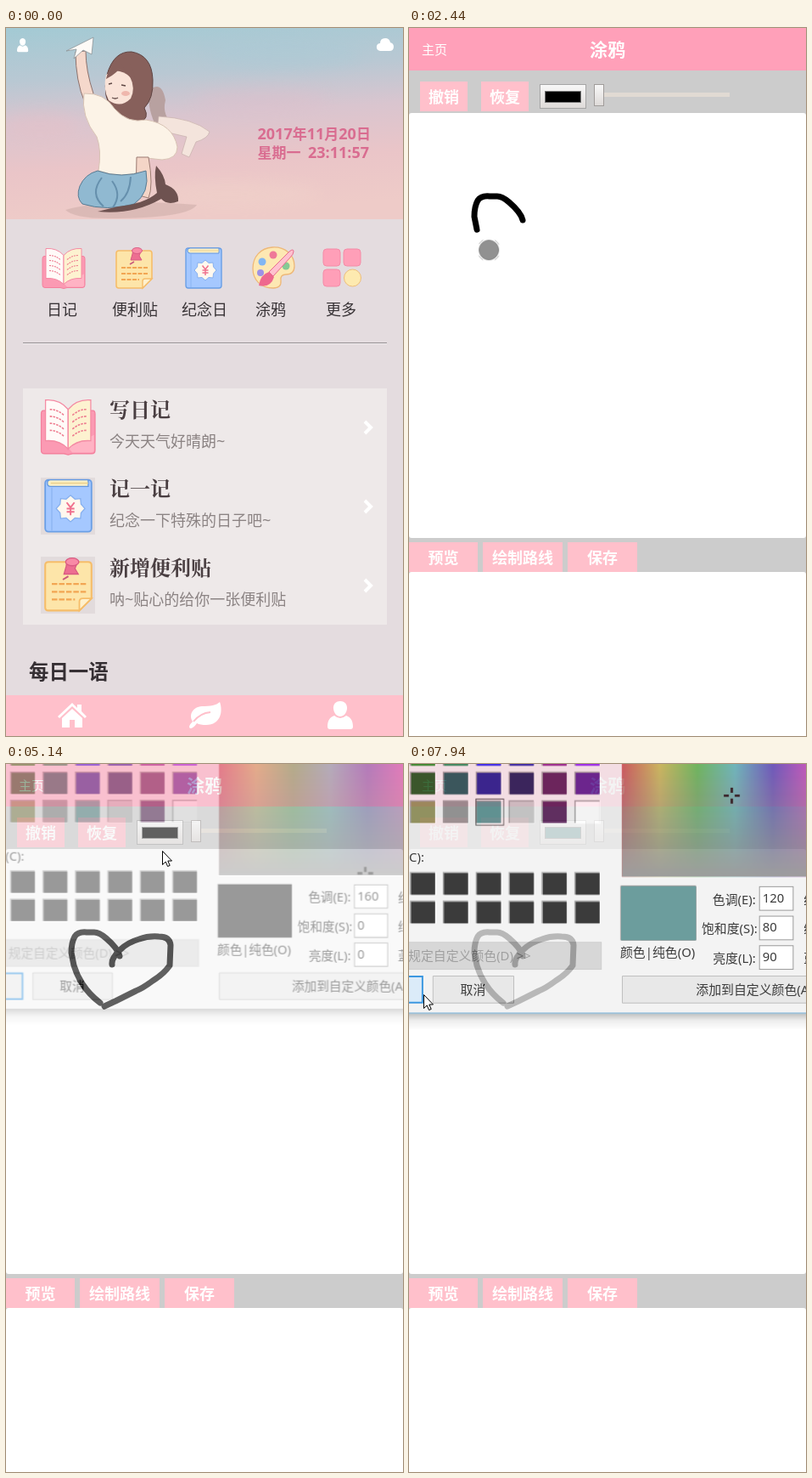
An HTML page that plays this animation: 468 by 833 pixels, repeating every 8000 ms.

```html
<!DOCTYPE html>
<html lang="zh-CN">
<head>
<meta charset="utf-8">
<title>涂鸦</title>
<style>
html, body { margin: 0; width: 100%; height: 100%; overflow: hidden; background: #fff; }
svg { display: block; width: 468px; height: 833px; }
text { font-family: "Noto Sans", "Noto Sans CJK SC", sans-serif; white-space: pre; }
.b { font-weight: 700; }
.w { fill: #fff; }
.serif { font-family: "Noto Serif CJK SC", "Noto Serif", serif; font-weight: 600; }
.anim, .anim * { animation: 8s linear infinite; }

#home { animation-name: home; }
#sec57 { animation-name: sec57; }
#sec58 { animation-name: sec58; }
#bar { animation-name: bar; }
#line1 { animation-name: line1; }
#line2 { animation-name: line2; }
.line { fill: none; stroke: #000; stroke-width: 7; stroke-linecap: round; stroke-linejoin: round; stroke-dasharray: 1 2; }
#touch { animation-name: touch, touchShow; }
#arrow { animation-name: arrow, arrowShow; }
#dialog { animation-name: dialog; transform-origin: 250px 0; }
#well { animation-name: well; }
.before { animation-name: before; }
.after { animation-name: after; }
#ok { animation-name: ok; }
#edge { animation-name: edge; }

@keyframes home { 0%, 14.12% { opacity: 1 } 14.125%, 100% { opacity: 0 } }
@keyframes sec57 { 0%, 3.74% { opacity: 1 } 3.75%, 100% { opacity: 0 } }
@keyframes sec58 { 0%, 3.74% { opacity: 0 } 3.75%, 100% { opacity: 1 } }
@keyframes bar { 0%, 18.8% { opacity: 1 } 22%, 100% { opacity: 0 } }
@keyframes line1 {
  0%, 25.6% { stroke-dashoffset: 1.1 } 25.625% { stroke-dashoffset: .99 }
  30.5% { stroke-dashoffset: .35 } 32.6%, 100% { stroke-dashoffset: 0 }
}
@keyframes line2 {
  0%, 36.24% { stroke-dashoffset: 1.1 } 36.25%, 38% { stroke-dashoffset: .99 }
  48.75% { stroke-dashoffset: .07 } 50.6%, 100% { stroke-dashoffset: 0 }
}
@keyframes touchShow {
  0%, 1.6% { opacity: 0 } 1.62%, 62.9% { opacity: 1 } 62.92%, 100% { opacity: 0 }
}
@keyframes touch {
  0%, 1.62% { transform: translate(320px, 627px) }
  7.12%, 10.5% { transform: translate(383px, 203px) }
  11.12%, 16.9% { transform: translate(304px, 293px) }
  18.87% { transform: translate(258px, 288px) }
  21.2% { transform: translate(185px, 248px) }
  22.5% { transform: translate(150px, 235px) }
  23.7%, 25.6% { transform: translate(137px, 228px) }
  26.6% { transform: translate(124px, 210px) }
  27.5% { transform: translate(106px, 199px) }
  28.5% { transform: translate(87px, 199px) }
  29.3% { transform: translate(78px, 213px) }
  30% { transform: translate(82px, 241px) }
  30.5% { transform: translate(94px, 261px) }
  32%, 33.5% { transform: translate(112px, 284px) }
  35.25%, 38% { transform: translate(128px, 241px) }
  39.3% { transform: translate(137px, 217px) }
  41% { transform: translate(161px, 204px) }
  42.5% { transform: translate(186px, 204px) }
  43.7% { transform: translate(196px, 217px) }
  44.8% { transform: translate(193px, 238px) }
  46% { transform: translate(178px, 253px) }
  47.4% { transform: translate(150px, 270px) }
  48.75% { transform: translate(128px, 284px) }
  50.6%, 52% { transform: translate(119px, 287px) }
  60.25%, 100% { transform: translate(183px, 90px) }
}
@keyframes arrowShow { 0%, 62.9% { opacity: 0 } 62.92%, 100% { opacity: 1 } }
@keyframes arrow {
  0%, 64.8% { transform: translate(184px, 102px) }
  71% { transform: translate(145px, 43px) }
  72.9% { transform: translate(151px, 27px) }
  79.6%, 84.6% { transform: translate(98px, 61px) }
  84.62%, 89% { transform: translate(98px, 53px) }
  97.5%, 100% { transform: translate(17px, 271px) }
}
@keyframes dialog {
  0%, 62.9% { opacity: 0; transform: scale(.962) }
  64.25% { opacity: .4; transform: scale(.977) }
  66.2%, 98.3% { opacity: 1; transform: none }
  99.25%, 100% { opacity: .77; transform: scale(.992) }
}
@keyframes well { 0%, 98.24% { fill: #000 } 98.25%, 100% { fill: #408080 } }
@keyframes before { 0%, 86.49% { opacity: 1 } 86.5%, 100% { opacity: 0 } }
@keyframes after { 0%, 86.49% { opacity: 0 } 86.5%, 100% { opacity: 1 } }
@keyframes ok { 0%, 96.9% { fill: #e1e1e1 } 97%, 100% { fill: #d0e6f8 } }
@keyframes edge { 0%, 98.2% { fill: #777 } 98.25%, 100% { fill: #2b86c5 } }
</style>
</head>
<body>
<svg class="anim" viewBox="0 0 468 833">
<defs>
  <linearGradient id="sky" x2=".12" y2="1">
    <stop stop-color="#a3cad4"/><stop offset=".28" stop-color="#b9c8d3"/><stop offset=".5" stop-color="#d9c5cf"/>
    <stop offset=".75" stop-color="#eac5c8"/><stop offset="1" stop-color="#eecbc8"/>
  </linearGradient>
  <linearGradient id="hue"></linearGradient>
  <linearGradient id="grey" x2="0" y2="1">
    <stop stop-color="#808080" stop-opacity="0"/><stop offset="1" stop-color="#808080"/>
  </linearGradient>
  <linearGradient id="shade" x2="0" y2="1"><stop stop-opacity=".32"/><stop offset=".4" stop-opacity=".1"/><stop offset="1" stop-opacity="0"/></linearGradient>
  <linearGradient id="knob" x2="0" y2="1"><stop stop-color="#f8f8f8"/><stop offset="1" stop-color="#dedad8"/></linearGradient>
  <filter id="soft"><feGaussianBlur stdDeviation="9"/></filter>

  <g id="book">
    <path d="M2 11H48Q50 11 50 14V45Q50 48 47 48H29L25 49L21 48H3Q0 48 0 45V14Q0 11 2 11Z" fill="#fb9ab3" stroke="#f4809d"/>
    <path d="M25 43L49 32V45Q49 47 46 47H29Z" fill="#ffb3c4"/>
    <path d="M25 10Q17 1 4 2V37Q17 36 25 44Z" fill="#fffaf8" stroke="#f48ba4"/>
    <path d="M25 10Q33 1 46 2V37Q33 36 25 44Z" fill="#fdf2d0" stroke="#f48ba4"/>
    <path d="M8 10Q15 10 21 15M8 16Q15 16 21 21M8 22Q15 22 21 27M8 28Q15 28 21 33M29 15Q35 10 42 10M29 21Q35 16 42 16M29 27Q35 22 42 22M29 33Q35 28 42 28" fill="none" stroke="#ee7c8f" stroke-width="1.2" stroke-dasharray="2 1"/>
  </g>
  <g id="note">
    <path d="M7 4H43Q46 4 46 7V37L35 48H7Q4 48 4 45V7Q4 4 7 4Z" fill="#fde5a9" stroke="#f6bd69" stroke-width="1.6"/>
    <path d="M46 37H38Q35 37 35 40V48Z" fill="#fff1cd" stroke="#f6bd69" stroke-width="1.4"/>
    <path d="M10 24H41M10 31H41M10 38H31" stroke="#f2a653" stroke-width="1.8" stroke-dasharray="5 1.5"/>
    <path d="M25 17L20 20" stroke="#c9577b" stroke-width="1.5"/>
    <path d="M24 2L33 5L31 10L34 15L21 15L23 8Z" fill="#ed6e91" stroke="#d95a82"/>
    <ellipse cx="28.500" cy="4" rx="6" ry="3.500" fill="#f88aa6" stroke="#d95a82"/>
  </g>
  <g id="memo">
    <rect x="4" y="2" width="42" height="47" rx="3" fill="#a5c8ff" stroke="#6a9fe6" stroke-width="1.4"/>
    <path d="M9 2H43V8H9Q6 8 6 5Q6 2 9 2Z" fill="#fdf0c4" stroke="#6296df"/>
    <path d="M9 5H43" stroke="#e9cf8d"/>
    <path d="M10 9V48" stroke="#8bb4f2"/>
    <path d="M27 16L31 19.500L36 19L36.500 24L40 28L36.500 32L36 37L31 36.500L27 40L23 36.500L18 37L17.500 32L14 28L17.500 24L18 19L23 19.500Z" fill="#fff8ee" stroke="#86b0ef"/>
    <path d="M23.500 22.500L27 27L30.500 22.500M27 27V34M23.500 28H30.500M23.500 31H30.500" fill="none" stroke="#f0718e" stroke-width="1.5"/>
  </g>
  <path id="person" d="M15 0C21 0 23.500 4.500 23 9C22.500 14 19 18 15 18S7.500 14 7 9C6.500 4.500 9 0 15 0ZM8 17Q15 23 22 17C28 19 30 24 30 30Q30 33 27 33H3Q0 33 0 30C0 24 2 19 8 17Z" fill="#fff"/>
</defs>

<g id="draw">
  <rect width="468" height="833" fill="#fff"/>
  <rect width="468" height="50" fill="#ffa0b9"/>
  <path d="M0 50H468V103H0ZM0 597H468V643H0Z" fill="#ccc"/>
  <rect y="100" width="468" height="500" rx="3" fill="#fff"/>
  <rect y="640" width="468" height="200" rx="3" fill="#fff"/>
  <text class="w" x="15" y="31" font-size="15">主页</text>
  <text class="w b" x="234" y="33" font-size="21" text-anchor="middle">涂鸦</text>
  <g id="buttons"></g>
  <rect x="154.500" y="66.500" width="54" height="28" fill="url(#knob)" stroke="#a5a5a5"/>
  <rect id="well" x="160.500" y="74.500" width="42" height="13" stroke="#777"/>
  <rect x="224" y="76" width="154" height="5" fill="#e1dad3"/>
  <rect x="218.500" y="66.500" width="11" height="25" fill="url(#knob)" stroke="#a09c9a"/>
  <path id="line1" class="line" pathLength="1" d="M134 226Q132 217 118 205Q110 198 104 198L95 198Q85 197 81 203Q77 210 77 222L80 237Q84 250 91 260Q98 271 111 281"/>
  <path id="line2" class="line" pathLength="1" d="M125 236Q124 229 134 219Q143 210 157 206Q168 202 180 203Q193 203 194 213L193 237Q186 247 173 255Q161 264 153 267L129 279L116 285"/>
  <rect id="bar" x="463" y="2" width="3" height="598" rx="1.500" fill-opacity=".12"/>
</g>

<g id="home">
  <rect width="468" height="833" fill="#e4dcdf"/>
  <rect width="468" height="225" fill="url(#sky)"/>
  <g filter="url(#soft)" opacity=".4">
    <ellipse cx="330" cy="30" rx="90" ry="18" fill="#a9cad6"/><ellipse cx="40" cy="115" rx="45" ry="16" fill="#e8bfc6"/>
    <ellipse cx="300" cy="85" rx="80" ry="14" fill="#dfbecb"/><ellipse cx="260" cy="195" rx="110" ry="15" fill="#f2d6cb"/>
  </g>
  <path d="M70 214Q120 200 225 208Q215 224 120 224Q80 224 70 214Z" fill="#c9aaa6" opacity=".5"/>
  <path d="M170 72Q184 62 188 85Q183 104 200 116L176 114Q165 90 170 72Z" fill="#b8a1a0"/>
  <path d="M180 104Q220 106 240 122Q238 130 224 134L216 152L207 148L213 128L178 120Z" fill="#f4e4dc" stroke="#c8b0ac" stroke-width=".7"/>
  <path d="M82 28L94 27Q94 50 103 77L93 88Q82 62 82 28Z" fill="#f5d8cb" stroke="#8d716c"/>
  <path d="M71 27L103 11L101 31L91 26L80 36L83 25Z" fill="#fdfaf7" stroke="#8b9296" stroke-width=".8"/>
  <path d="M119 55Q127 27 148 28Q172 32 173 61Q174 83 163 94Q170 107 157 111Q137 114 127 97Q113 83 119 55Z" fill="#87605b" stroke="#5f4442"/>
  <path d="M118 55Q131 45 146 57Q153 71 147 83Q135 95 121 85Q114 72 118 55Z" fill="#fae3d8"/>
  <path d="M118 60Q132 53 137 43Q141 55 151 62Q153 48 140 35Q123 38 118 60Z" fill="#87605b"/>
  <path d="M121 66L125 65M136 67L141 68M125 82Q129 84 132 82" stroke="#5e4744" stroke-width="1.300" fill="none"/>
  <ellipse cx="141" cy="77" rx="5" ry="3" fill="#efb7ad"/>
  <path d="M92 77Q116 76 128 95Q144 113 165 108Q197 113 202 140Q202 154 184 155L166 153L163 168Q136 178 109 168Q113 144 107 128Q88 104 92 77Z" fill="#fcf3e7" stroke="#d8c3b4"/>
  <path d="M154 152H168Q174 186 168 200L153 196Z" fill="#f4d5c7" stroke="#9b7b72"/>
  <path d="M108 168Q136 178 165 168Q170 194 151 207Q119 216 90 207Q82 199 87 186Q93 172 108 168Z" fill="#90b9d1" stroke="#587b92"/>
  <path d="M113 176Q98 195 115 210M125 180Q137 196 126 211M147 175Q146 195 135 204" fill="none" stroke="#6690ad" stroke-width="2"/>
  <path d="M132 210Q163 207 178 194Q174 174 177 162Q187 173 188 184Q204 190 203 204Q190 209 183 201Q150 220 108 216Z" fill="#6e5250"/>
  <use href="#person" transform="translate(13 12) scale(.44 .49)"/>
  <path d="M441 27Q436 26 437 21Q438 18 441 18Q441 12 447 12Q452 12 453 17Q457 18 457 22Q457 27 452 27Z" fill="#fff"/>
  <g class="b" font-size="17" fill="#d96c90" id="date"></g>
  <use href="#book" x="43" y="257.500"/><use href="#note" x="126" y="258"/><use href="#memo" x="208" y="257"/>
  <g transform="translate(290 257)">
    <path d="M24 1C39 0 50 10 50 23Q50 33 40 33Q33 33 34 40Q35 49 25 49C10 49 1 39 1 26C1 12 10 2 24 1Z" fill="#fde8b3" stroke="#eeb878" stroke-width="1.300"/>
    <circle cx="12" cy="18" r="4.500" fill="#81b6f3"/><circle cx="25" cy="10" r="4.500" fill="#ef7898"/><circle cx="10" cy="31" r="4" fill="#9d91e6"/><circle cx="40" cy="23" r="4.500" fill="#86c994"/>
    <path d="M20 30L44 6Q49 2 49 6Q49 9 45 13L25 35Z" fill="#ffc1cf" stroke="#e86b8d"/>
    <path d="M20 30Q10 33 8 46Q22 49 26 36Z" fill="#ee688e"/>
  </g>
  <g transform="translate(373 259)" fill="#ff9fb8" stroke="#f48ba7">
    <rect x="1" y="1" width="20" height="20" rx="4"/><rect x="25" y="1" width="20" height="20" rx="4"/><rect x="1" y="25" width="20" height="20" rx="4"/>
    <circle cx="35.500" cy="35" r="10" fill="#fdeab0" stroke="#edbd79"/>
  </g>
  <g id="labels" fill="#383336" font-size="18"></g>
  <path d="M20 370.500H449" stroke="#969093"/><path d="M20 371.500H449" stroke="#f1edef"/>
  <rect x="20" y="424" width="429" height="278" fill="#eee9e9"/>
  <path d="M41 529h64v67h-64zM41 622h64v67h-64z" fill="#e2dbdc"/>
  <use href="#book" transform="translate(41.500 435) scale(1.270 1.370)"/>
  <use href="#memo" transform="translate(41 529) scale(1.300)"/>
  <use href="#note" transform="translate(41 623) scale(1.300)"/>
  <g id="rows"></g>
  <text class="b" x="27" y="766" font-size="23.400" fill="#352f33">每日一语</text>
  <rect y="785" width="468" height="48" fill="#ffc0cb"/>
  <path d="M61 810L78 794L84 800V796H89V804L95 810L93 812L78 798L63 812ZM66 812L78 801L90 812V823H81V814H75V823H66Z" fill="#fff"/>
  <path d="M252 793C256 804 253 820 236 820Q229 820 225 818Q221 824 217 824Q214 822 220 816C215 808 220 799 231 798C241 798 248 797 252 793Z" fill="#fff"/>
  <path d="M221 816Q229 806 241 805" fill="none" stroke="#ffc0cb" stroke-width="2"/>
  <use href="#person" x="379" y="792"/>
</g>

<g id="touch">
  <circle r="13.500" fill="#fff"/>
  <circle r="13.500" fill="none" stroke="#aaa" stroke-width=".8" stroke-dasharray="7 14.200" transform="rotate(30)"/>
  <circle r="11.500" fill="#919191" stroke="#858585"/>
</g>

<g id="dialog">
  <rect x="-100" y="296" width="700" height="20" fill="url(#shade)"/>
  <rect x="-100" y="-300" width="700" height="595" fill="#f0f0f0"/>
  <rect id="edge" x="-100" y="295" width="700" height="1"/>
  <g id="swatches"></g>
  <rect class="after" x="77.500" y="41.500" width="33" height="31" fill="none" stroke="#333"/>
  <rect x="251" y="-152" width="269" height="286" fill="url(#hue)"/>
  <rect x="251" y="-152" width="269" height="286" fill="url(#grey)"/>
  <path d="M250 134.500H520" stroke="#fff"/>
  <path class="before" d="M418 131.500h6M431 131.500h6M427.500 124v6" stroke="#000" stroke-width="3"/>
  <path class="after" d="M372 37.500h6M385 37.500h6M381.500 28v6M381.500 41v6" stroke="#000" stroke-width="3"/>
  <path d="M249.500 209V144.500H339" fill="none" stroke="#a0a0a0"/>
  <rect x="250" y="145" width="89" height="64"/>
  <rect class="after" x="250" y="145" width="89" height="64" fill="#408080"/>
  <rect x="-100.500" y="211.500" width="327" height="32" fill="#ccc" stroke="#bfbfbf"/>
  <rect id="ok" x="-80" y="252" width="94" height="31" stroke="#0078d7" stroke-width="2"/>
  <path d="M26.500 251.500h96v32h-96zM251.500 251.500h300v32h-300z" fill="#e1e1e1" stroke="#adadad"/>
  <g id="form" font-size="15"></g>
</g>

<path id="arrow" d="M.5.5V16.500L4.200 13L6.600 18.500L9.200 17.400L6.800 12H11.500Z" fill="#fff" stroke="#000"/>
</svg>
<script>
const put = (id, list) => document.getElementById(id).innerHTML = list.join('');
const text = (x, y, s, attrs = '') => `<text x="${x}" y="${y}" ${attrs}>${s}</text>`;
const rect = (x, y, w, h, fill) => `<rect x="${x}" y="${y}" width="${w}" height="${h}" fill="${fill}"/>`;
const bigDigits = s => s.replace(/[\d:]+/g, '<tspan font-size="18">$&</tspan>');
const end = 'text-anchor="end"', mid = 'text-anchor="middle"';

put('hue', [...Array(13).keys()].map(i => `<stop offset="${i / 12}" stop-color="hsl(${i * 30},100%,50%)"/>`));

put('date', [
  text(296.5, 131, bigDigits('2017年11月20日')),
  text(296.5, 153, '星期一'),
  text(356, 153, bigDigits('23:11:57'), 'id="sec57"'),
  text(356, 153, bigDigits('23:11:58'), 'id="sec58"')
]);

put('labels', ['日记', '便利贴', '纪念日', '涂鸦', '更多'].map((s, i) => text([66, 152, 234, 312, 395][i], 338, s, mid)));

put('rows', [
  ['写日记', '今天天气好晴朗~'],
  ['记一记', '纪念一下特殊的日子吧~'],
  ['新增便利贴', '呐~贴心的给你一张便利贴']
].map(([title, sub], i) => `<g transform="translate(0 ${i * 93})">` +
  text(122, 458, title, 'class="serif" font-size="24" fill="#4a3f42"') +
  text(122, 493, sub, 'font-size="18" fill="#8b8383"') +
  '<path d="M423 463L430 470L423 477" fill="none" stroke="#fff" stroke-width="4"/></g>'));

put('buttons', [
  [13, 63, 56, '撤销'], [85, 63, 56, '恢复'],
  [0, 605, 81, '预览'], [87, 605, 94, '绘制路线'], [187, 605, 82, '保存']
].map(([x, y, w, s]) => rect(x, y, w, 35, '#ffc0cb') +
  text(x + w / 2, y + 24.5, s, `class="w b" font-size="18" ${mid}`)));

const black = Array(6).fill('000');
const palette = [
  [-25, ['008000', '008040', '0000ff', '0000a0', '800080', '8000ff']],
  [9, ['004000', '004040', '000080', '000040', '400040', '400080']],
  [43, ['808040', '808080', '408080', 'c0c0c0', '400040', 'fff']],
  [128, black], [162, black]
];
put('swatches', palette.flatMap(([y, row]) => row.map((c, i) => {
  const x = -1 + i * 39.1;
  return rect(x, y, 31, 28, '#fff') + rect(x, y, 30, 27, '#8c8c8c') + rect(x + 1.5, y + 1.5, 28.5, 25.5, '#' + c);
})));

const fields = [['色调(E):', '160', '120', '红(R):'], ['饱和度(S):', '0', '80', '绿(G):'], ['亮度(L):', '0', '90', '蓝(U):']];
put('form', [
  text(16, 116, '自定义颜色(C):', end),
  text(-3, 233, '规定自定义颜色(D) &gt;&gt;', 'fill="#838383"'),
  text(74, 273, '取消', mid),
  text(339, 273, '添加到自定义颜色(A)'),
  text(249, 229, '颜色|纯色(O)'),
  ...fields.map(([name, a, b, side], i) => {
    const y = 145 + i * 35;
    return text(i == 1 ? 412 : 410, y + 21, name, end) +
      `<rect x="414.5" y="${y + .5}" width="40" height="28" fill="#fff" stroke="#7a7a7a"/>` +
      text(418, y + 19, a, 'class="before"') + text(418, y + 19, b, 'class="after"') +
      text(467, y + 21, side);
  })
]);
</script>
</body>
</html>
```
